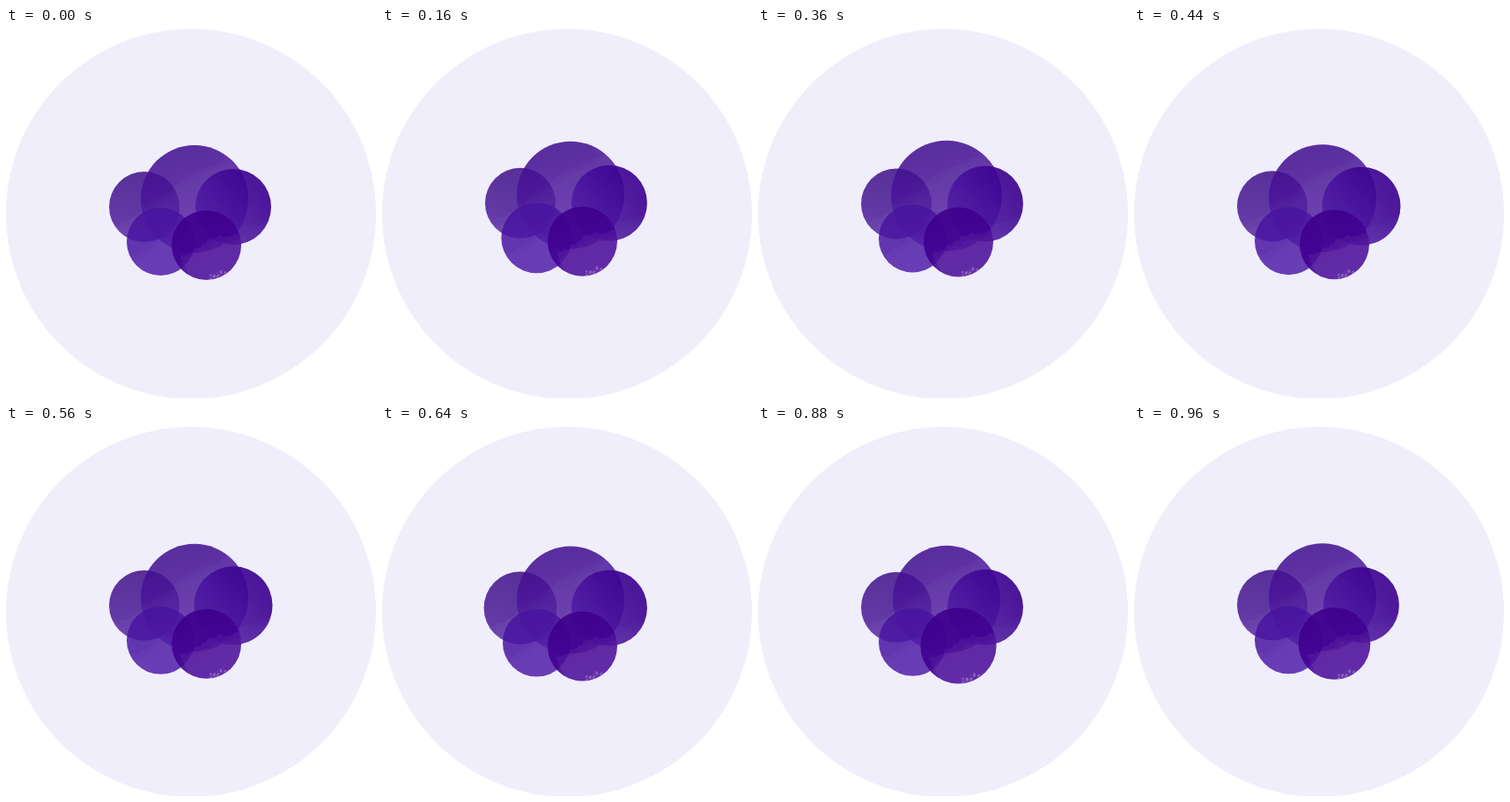
An HTML page that plays this animation: 420 px wide and 420 px high, repeating every 1 s.

```html
<!DOCTYPE html>
<html lang="en">
<head>
<meta charset="utf-8">
<title>Bobbing cloud</title>
<style>
html, body { margin: 0; width: 100%; height: 100%; overflow: hidden; background: #fff; }
svg { display: block; width: 100vw; height: 100vh; }
</style>
</head>
<body>
<svg viewBox="0 0 420 420">
  <defs id="defs"></defs>
  <circle cx="210" cy="211" r="210" fill="#f0eefa"/>
  <g id="cloud"></g>
</svg>
<script>
const LOOP = 1000, STEP = 40, BOB = 6, PULSE = 200;

// Back to front. dir: gradient direction; edge: ragged line, lighter on its right-hand side.
const puffs = [
  { x: 157, y: 203, r: 40, grow: 4, start: 600, alpha: .85,
    dark: '#3f1088', light: '#4e1d9b', dir: [-.3, 1], edge: [-34, 20, 40, -14], glow: .035 },
  { x: 214, y: 194, r: 61, grow: 5.2, start: 200, alpha: .85,
    dark: '#420d91', light: '#5622a6', dir: [.25, 1], edge: [-62, 12, 40, -52], glow: .025 },
  { x: 258, y: 203, r: 43, grow: 4.5, start: 400, alpha: .9,
    dark: '#3b0090', light: '#4f1da3', dir: [-.8, .6], edge: [-30, 48, 48, 8], glow: .02 },
  { x: 175.5, y: 242.5, r: 38.5, grow: 4.6, start: 0, alpha: .85,
    dark: '#48149f', light: '#4c17a6', dir: [.3, 1], edge: [-40, 18, 40, -18], glow: .02 },
  { x: 227.5, y: 246.5, r: 39.5, grow: 4, start: 800, alpha: .9,
    dark: '#3e008c', light: '#440398', dir: [.5, 1], edge: [-30, 12, 42, -20], glow: .05,
    flecks: true }
];

const NS = 'http://www.w3.org/2000/svg';
let seed = 7;
const rand = () => (seed = (seed * 16807) % 2147483647) / 2147483647;

function add(parent, tag, attrs) {
  const el = document.createElementNS(NS, tag);
  for (const k in attrs) el.setAttribute(k, attrs[k]);
  return parent.appendChild(el);
}

function raggedPath([x1, y1, x2, y2]) {
  const n = 22, dx = x2 - x1, dy = y2 - y1, len = Math.hypot(dx, dy);
  const nx = -dy / len, ny = dx / len;
  let d = '';
  for (let i = 0; i <= n; i++) {
    const k = i / n, w = (rand() - .5) * 5 + Math.sin(k * 9) * 2;
    d += `${i ? 'L' : 'M'}${(x1 + dx * k + nx * w).toFixed(1)} ${(y1 + dy * k + ny * w).toFixed(1)}`;
  }
  return `${d}L${x2 + nx * 150} ${y2 + ny * 150}L${x1 + nx * 150} ${y1 + ny * 150}Z`;
}

const defs = document.getElementById('defs');
const cloud = document.getElementById('cloud');

puffs.forEach((p, i) => {
  const [gx, gy] = p.dir.map(v => v * p.r * .8);
  const grad = add(defs, 'linearGradient', {
    id: 'shade' + i, gradientUnits: 'userSpaceOnUse', x1: -gx, y1: -gy, x2: gx, y2: gy
  });
  add(grad, 'stop', { offset: 0, 'stop-color': p.dark });
  add(grad, 'stop', { offset: 1, 'stop-color': p.light });
  add(add(defs, 'clipPath', { id: 'disc' + i }), 'circle', { r: p.r });

  p.el = add(cloud, 'g', { opacity: p.alpha });
  add(p.el, 'circle', { r: p.r, fill: `url(#shade${i})` });
  const wash = add(p.el, 'g', { 'clip-path': `url(#disc${i})`, fill: '#fff' });
  add(wash, 'path', { d: raggedPath(p.edge), opacity: p.glow });
  add(wash, 'path', { d: raggedPath(p.edge.map((v, j) => j % 2 ? v + 7 : v)), opacity: p.glow / 2 });
  if (p.flecks) {
    for (let n = 0; n < 14; n++) {
      const a = .95 + rand() * .5, d = p.r - rand() * 6;
      add(wash, 'circle', {
        cx: Math.cos(a) * d, cy: Math.sin(a) * d, r: .6 + rand() * 1.3, opacity: .2
      });
    }
  }
});

const ease = x => (1 - Math.cos(Math.PI * x)) / 2;

// Eased quarter by quarter: rest, up, rest, down, rest.
function bob(t) {
  const stops = [0, -BOB, 0, BOB, 0];
  const q = t / LOOP * 4, i = Math.floor(q);
  return stops[i] + (stops[i + 1] - stops[i]) * ease(q - i);
}

function pulse(t) {
  return t <= 0 || t >= PULSE ? 0 : ease(t / PULSE * 2);
}

function draw(time) {
  const t = Math.floor((time % LOOP) / STEP) * STEP;
  const dy = bob(t);
  for (const p of puffs) {
    const s = 1 + p.grow / p.r * pulse(t - p.start);
    p.el.setAttribute('transform', `translate(${p.x} ${p.y + dy}) scale(${s})`);
  }
}

const begin = performance.now();
function tick() {
  draw(performance.now() - begin);
  requestAnimationFrame(tick);
}
tick();
</script>
</body>
</html>
```
